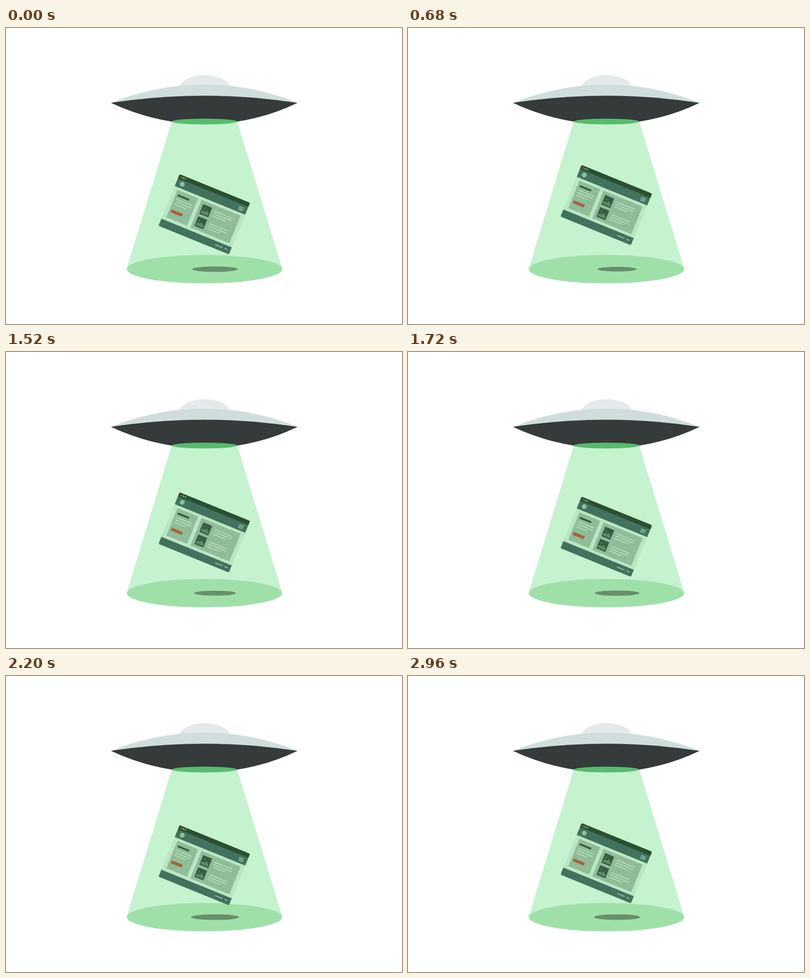
An HTML page for the animation above (3 s loop, 800x600 px).

```html
<!DOCTYPE html>
<html lang="en">
<head>
<meta charset="utf-8">
<title>Saucer and page</title>
<style>
  html, body { margin: 0; width: 100%; height: 100%; overflow: hidden; background: #fff; }
  svg { display: block; width: 800px; height: 600px; }
</style>
</head>
<body>
<svg viewBox="0 0 800 600">
  <defs>
    <clipPath id="page"><rect width="154" height="113" rx="3"/></clipPath>
    <g id="thumb">
      <rect width="19.5" height="21" fill="#365d41"/>
      <path d="M1.5 18.3V15L5.5 11.5 8 13.5 12 9 18 15.5V18.3Z" fill="#5c8c67"/>
      <circle cx="5.8" cy="7.3" r="1.4" fill="#5c8c67"/>
    </g>
    <path id="text" d="M0 0H39.5M0 5.2H39.5M0 10.4H27.5"/>
  </defs>

  <!-- beam -->
  <path d="M335 189H467L557.5 486 401 500 244.5 486Z" fill="#c5f2cf"/>
  <ellipse cx="401" cy="488.8" rx="157" ry="28.8" fill="#9fe0a9"/>
  <ellipse id="shadow" cx="422.4" cy="488.8" rx="46" ry="5.5" fill="#688f6b"/>

  <!-- saucer -->
  <path d="M350 119C362 88 440 88 453 119Z" fill="#e3eae9"/>
  <path d="M212 151.7Q400.5 77.3 589 151.7Z" fill="#cfdedc"/>
  <path d="M212 151.7Q400.5 122.7 589 151.7Q530 180 467 189.8H335Q272 180 212 151.7Z" fill="#353a3b"/>
  <ellipse cx="401" cy="189.6" rx="66" ry="5.8" fill="#58bb6c"/>

  <!-- web page -->
  <g id="card">
    <g transform="translate(350.6 296.1) rotate(22.2)">
      <g clip-path="url(#page)">
        <rect width="154" height="113" fill="#b9e7c3"/>
        <rect width="154" height="26" fill="#42725d"/>
        <rect width="154" height="9" fill="#2a5031"/>
        <rect y="97.6" width="154" height="16" fill="#42725d"/>
      </g>
      <circle cx="5.6" cy="4.6" r="1.6" fill="#a8633c"/>
      <circle cx="10.1" cy="4.5" r="1.6" fill="#b9ae5c"/>
      <circle cx="14.6" cy="4.4" r="1.6" fill="#62b268"/>
      <circle cx="12.8" cy="16.9" r="4.9" fill="#8ac49b"/>
      <path d="M136.2 15H146.4M136.2 18H146.4M136.2 21H146.4" stroke="#a5dbb4" stroke-width="1.3"/>
      <path d="M120.6 105.2H136.8M141.2 105.2H147.4" stroke="#a5dbb4" stroke-width="1.5"/>

      <g fill="#90bc9a">
        <rect x="8.3" y="31.3" width="45.2" height="59.8"/>
        <rect x="61" y="31.5" width="85" height="60.3"/>
      </g>
      <rect x="12.8" y="39.2" width="25" height="3.8" fill="#335b3e"/>
      <rect x="12.7" y="72.3" width="24" height="6.1" fill="#a9623a"/>
      <g fill="none" stroke="#bce8c6" stroke-width="1.4">
        <path d="M13.3 49.6H47.2M13.3 55H47.2M13.3 60.3H38"/>
        <use href="#text" x="93.7" y="42.9"/>
        <use href="#text" x="93.7" y="70.2"/>
      </g>
      <use href="#thumb" x="67.3" y="38.3"/>
      <use href="#thumb" x="67.3" y="64.8"/>
    </g>
  </g>
</svg>
<script>
  const LOOP = 3000, HALF = 1500, STEP = 40;
  const TURN = 1150;              // moment the page starts to sink
  const TOP = -20.5, TRAVEL = 28.2;
  const card = document.getElementById('card');
  const shadow = document.getElementById('shadow');

  const bez = (a, b, s) => 3 * (1 - s) * (1 - s) * s * a + 3 * (1 - s) * s * s * b + s * s * s;

  // cubic-bezier(.33, 0, .2, 1)
  function ease(x) {
    let lo = 0, hi = 1;
    for (let i = 0; i < 24; i++) {
      const mid = (lo + hi) / 2;
      if (bez(0.33, 0.2, mid) < x) lo = mid; else hi = mid;
    }
    return bez(0, 1, lo);
  }

  function draw(now) {
    const t = Math.floor((now % LOOP) / STEP) * STEP;
    const phase = (t - TURN + LOOP) % LOOP;
    const p = ease((phase % HALF) / HALF);
    const y = TOP + TRAVEL * (phase < HALF ? p : 1 - p);
    const rx = 46.2 + 0.34 * y;
    card.setAttribute('transform', `translate(0 ${y.toFixed(2)})`);
    shadow.setAttribute('rx', rx.toFixed(2));
    shadow.setAttribute('ry', (rx * 0.12).toFixed(2));
  }

  const start = performance.now();
  function tick() {
    draw(performance.now() - start);
    requestAnimationFrame(tick);
  }
  tick();
</script>
</body>
</html>
```
